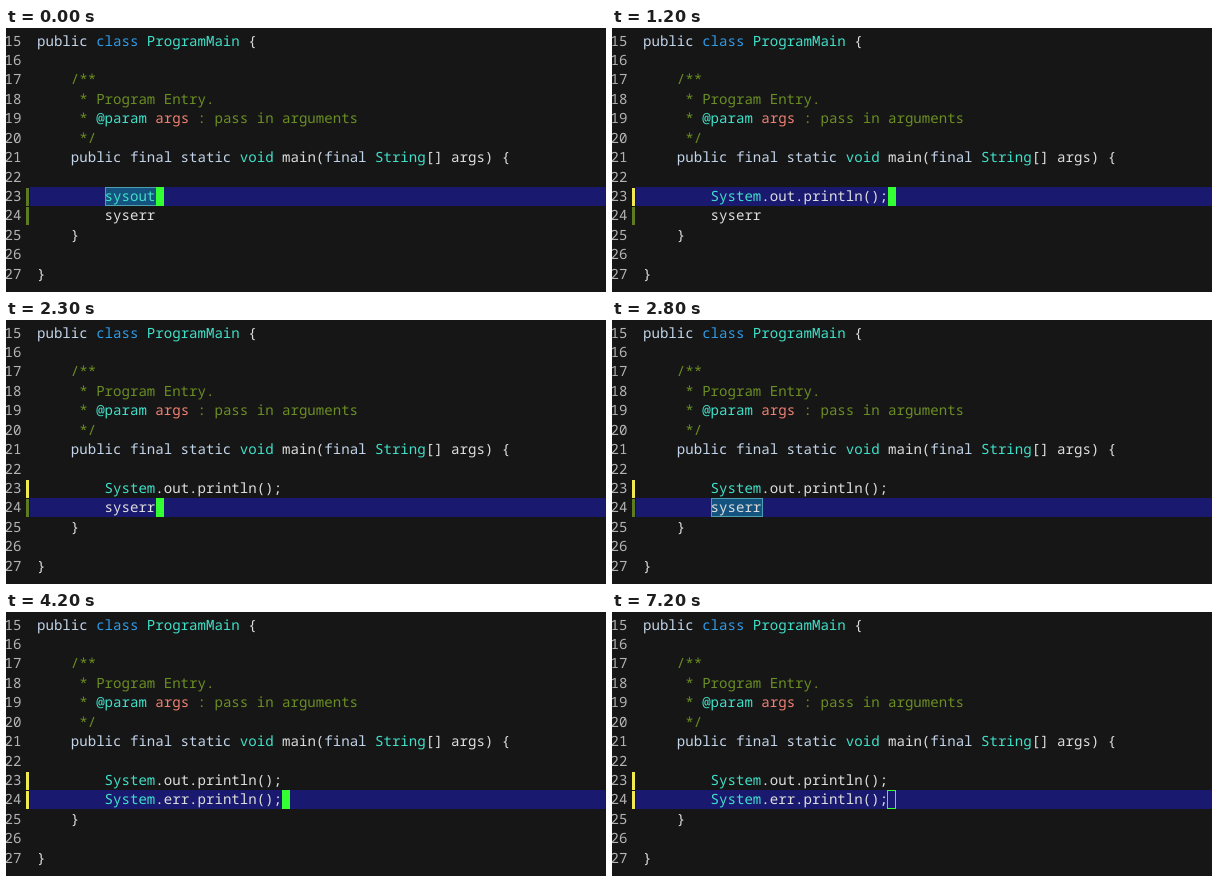
These frames come from a looping animation (600 by 264 pixels, 7300 ms). An HTML page with a canvas:

```html
<!DOCTYPE html>
<html lang="en">
<head>
<meta charset="utf-8">
<title>Snippet expansion</title>
<style>
html, body { margin: 0; width: 600px; height: 264px; overflow: hidden; background: #161616; }
canvas { display: block; }
</style>
</head>
<body>
<canvas id="stage" width="600" height="264"></canvas>
<script>
const ctx = document.getElementById("stage").getContext("2d");
const LOOP = 7300;
const CHAR = 8.45, ROW = 19.42, LEFT = 31, FIRST = 15, TOP = 3.6;
const COLOR = {
  bg: "#161616", number: "#b4b4b4", plain: "#dedede", modifier: "#c3d5ea",
  keyword: "#2e9be6", type: "#40e0c8", comment: "#6b8e23", param: "#f08072",
  line: "#19196f", cursor: "#33ff33", added: "#5d7c22", changed: "#f0ea50",
  match: "#14527f", matchEdge: "#4c9fae"
};

// Times in ms of the edits and of the cursor's visible periods.
const EXPAND_OUT = 1200, MOVE_DOWN = 2300, MATCH_ERR = 2500, EXPAND_ERR = 3700;
const UNFOCUS = 7000;
const CURSOR_ON = [[0, 400], [900, 1700], [2200, 2800], [3300, 4300],
                   [4800, 5300], [5800, 6300], [6800, UNFOCUS]];

// Each entry: line number, starting column, then [style, text] tokens.
const CODE = [
  [15, 0, ["modifier", "public "], ["keyword", "class "], ["type", "ProgramMain "], ["plain", "{"]],
  [17, 4, ["comment", "/**"]],
  [18, 4, ["comment", " * Program Entry."]],
  [19, 4, ["comment", " * "], ["type", "@param "], ["param", "args "], ["comment", ": pass in arguments"]],
  [20, 4, ["comment", " */"]],
  [21, 4, ["modifier", "public final static "], ["type", "void "], ["plain", "main("],
    ["modifier", "final "], ["type", "String"], ["plain", "[] args) {"]],
  [25, 4, ["plain", "}"]],
  [27, 0, ["plain", "}"]]
];

const rowTop = n => Math.round(TOP + (n - FIRST) * ROW);
const colX = c => LEFT + c * CHAR;

function rect(color, x, y, w, h) {
  ctx.fillStyle = color;
  ctx.fillRect(x, y, w, h);
}

function outline(color, x, y, w, h) {
  ctx.strokeStyle = color;
  ctx.lineWidth = 1;
  ctx.strokeRect(x + 0.5, y + 0.5, w - 1, h - 1);
}

function write(n, col, ...tokens) {
  const y = TOP + (n - FIRST) * ROW + 14;
  for (const [style, text] of tokens) {
    ctx.fillStyle = COLOR[style];
    ctx.fillText(text, colX(col), y);
    col += text.length;
  }
}

function statement(n, stream, expanded, abbreviationStyle) {
  if (expanded) write(n, 8, ["type", "System"], ["plain", `.${stream}.println();`]);
  else write(n, 8, [abbreviationStyle, "sys" + stream]);
}

function drawCursor(t, n, expanded) {
  const x = Math.round(colX(expanded ? 29 : 14.1)), y = rowTop(n);
  if (t >= UNFOCUS) outline(COLOR.cursor, x - 1, y, 9, 19);
  else if (CURSOR_ON.some(([on, off]) => t >= on && t < off)) rect(COLOR.cursor, x, y, 8, 19);
}

function draw(t) {
  const outDone = t >= EXPAND_OUT, errDone = t >= EXPAND_ERR;
  const active = t < MOVE_DOWN ? 23 : 24;
  const activeDone = active === 23 ? outDone : errDone;
  const matched = !activeDone && (active === 23 || t >= MATCH_ERR);

  rect(COLOR.bg, 0, 0, 600, 264);
  rect(COLOR.line, 24, rowTop(active), 576, 19);
  for (const [n, done] of [[23, outDone], [24, errDone]])
    rect(done ? COLOR.changed : COLOR.added, 20, rowTop(n) + 1, 3, 18);
  if (matched) {
    rect(COLOR.match, 99, rowTop(active), 51, 19);
    outline(COLOR.matchEdge, 99, rowTop(active), 52, 19);
  }

  for (let n = FIRST; n <= 27; n++) write(n, -3.85, ["number", String(n)]);
  for (const [n, col, ...tokens] of CODE) write(n, col, ...tokens);
  statement(23, "out", outDone, "type");
  statement(24, "err", errDone, "plain");
  drawCursor(t, active, activeDone);
}

ctx.font = '14.08px "Noto Sans Mono", "DejaVu Sans Mono", monospace';
ctx.textBaseline = "alphabetic";
ctx.textRendering = "geometricPrecision";

const start = performance.now();
function tick() {
  draw((performance.now() - start) % LOOP);
  requestAnimationFrame(tick);
}
tick();
</script>
</body>
</html>
```
